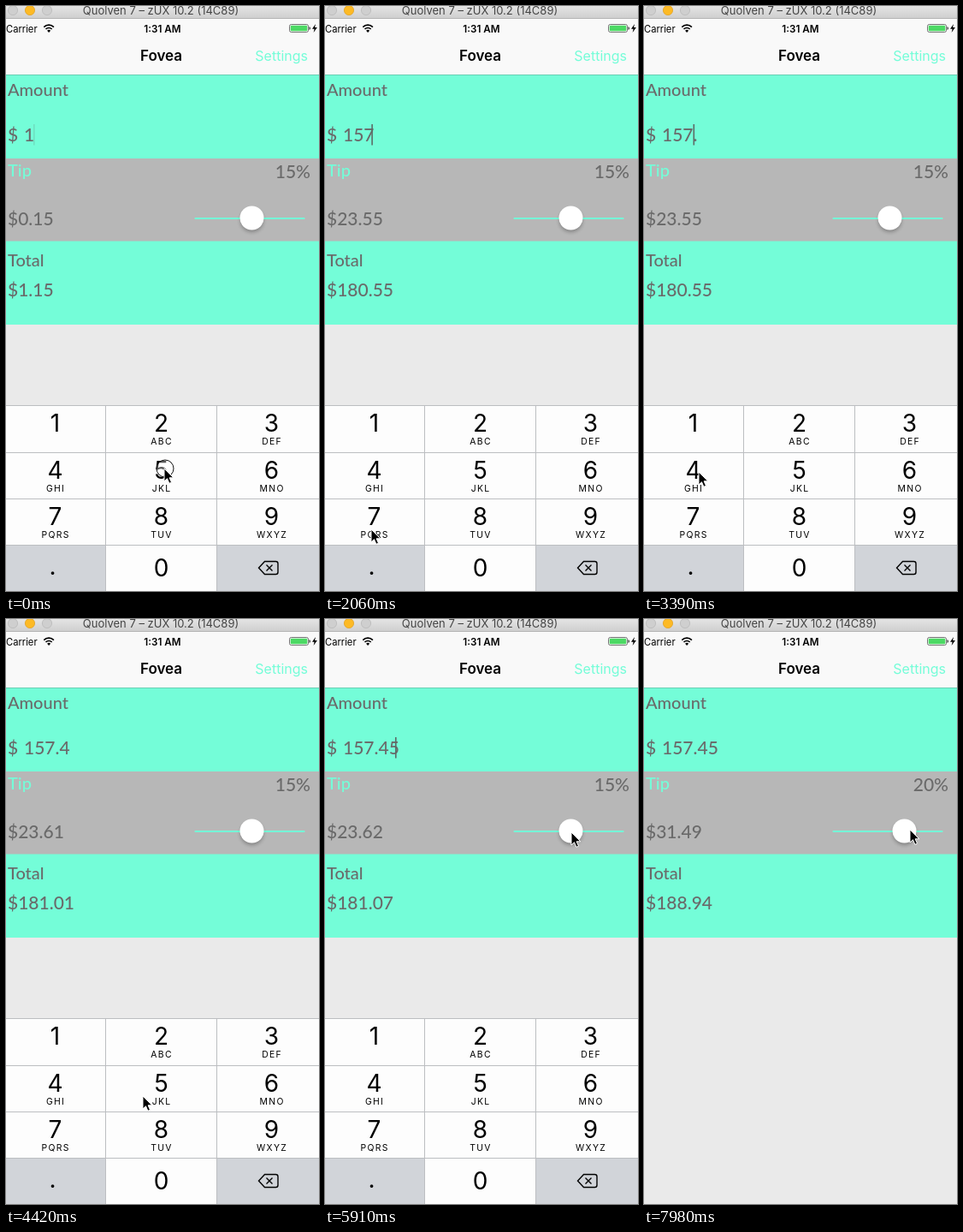
Recreate the animation shown at these times as an HTML page. Size 366 by 683 pixels, loop 8 s.

```html
<!DOCTYPE html>
<html lang="en">
<head>
<meta charset="utf-8">
<title>Tip calculator</title>
<style>
  html, body { margin: 0; width: 100%; height: 100%; overflow: hidden; background: #eaeaea; }
  svg { display: block; width: 366px; height: 683px; }
  text { font-family: Inter, Roboto, sans-serif; white-space: pre; }
  .mid { text-anchor: middle; }
  .label, .value { font-family: Lato, "Open Sans", sans-serif; font-weight: 500; fill: #6a6a6a; }
  .label { font-size: 20px; }
  .value { font-size: 21px; }
  .mint { fill: #74fdd8; }
  .digit { font-size: 28px; text-anchor: middle; }
  .letters { font-size: 10.4px; letter-spacing: 1.3px; text-anchor: middle; }
</style>
</head>
<body>
<svg viewBox="0 0 366 683" xmlns="http://www.w3.org/2000/svg">
  <defs>
    <linearGradient id="bar" x2="0" y2="1">
      <stop stop-color="#e4e4e4"/><stop offset="1" stop-color="#cecece"/>
    </linearGradient>
    <filter id="soft" x="-50%" y="-50%" width="200%" height="200%">
      <feGaussianBlur stdDeviation="2"/>
    </filter>
  </defs>
  <rect width="366" height="683" fill="#eaeaea"/>

  <!-- window bar -->
  <rect width="366" height="15" fill="url(#bar)"/>
  <rect y="14" width="366" height="1" fill="#b4b4b4"/>
  <g fill="#cfcfcf" stroke="#b9b9b9" stroke-width=".8">
    <circle cx="8" cy="5" r="5.6"/>
    <circle cx="28" cy="5" r="5.6" fill="#fdba25" stroke="#e2a323"/>
    <circle cx="48" cy="5" r="5.6"/>
  </g>
  <text class="mid" x="181" y="10" font-size="13" fill="#444">Quolven 7 – zUX 10.2 (14C89)</text>

  <!-- status and navigation -->
  <rect y="15" width="366" height="65" fill="#f9f9f9"/>
  <text x="0" y="30.5" font-size="11.2">Carrier</text>
  <g fill="none" stroke="#000" stroke-width="1.7">
    <path d="M44.3 24.6a8.2 8.2 0 0 1 11.6 0M46.5 27a5.1 5.1 0 0 1 7.2 0"/>
    <path d="M50.1 31l-2-2.2a2.9 2.9 0 0 1 4 0z" fill="#000" stroke="none"/>
  </g>
  <text class="mid" x="183" y="30.5" font-size="11.7" font-weight="600">1:31 AM</text>
  <rect x="331.5" y="21.5" width="22" height="9" rx="2" fill="none" stroke="#555" stroke-width=".8"/>
  <rect x="332.7" y="22.7" width="19.6" height="6.6" rx="1" fill="#4cd964"/>
  <path d="M354.5 24v4q1.6-.6 1.6-2t-1.6-2z" fill="#444"/>
  <path d="M362 21l-4 5.7h2.6l-1 4.3 4.3-6h-2.8z"/>
  <text class="mid" x="181.5" y="64" font-size="17" font-weight="600">Fovea</text>
  <text class="mint" x="353" y="64" font-size="16" text-anchor="end">Settings</text>

  <!-- calculator -->
  <rect class="mint" y="80" width="366" height="292"/>
  <rect y="80" width="366" height="1" fill="#69cfb4"/>
  <rect y="178" width="366" height="96.5" fill="#b7b7b7"/>
  <text class="label" x="2" y="105">Amount</text>
  <text class="label mint" x="2" y="199" style="fill:#74fdd8">Tip</text>
  <text class="label" x="2" y="304">Total</text>
  <text class="value" id="amount" x="2" y="158" word-spacing="1.5"></text>
  <text class="value" id="tip" x="2" y="255.5"></text>
  <text class="value" id="total" x="2" y="338.5"></text>
  <text class="value" id="percent" x="356" y="201" text-anchor="end"></text>
  <rect id="caret" y="138" width="1.6" height="24.5" fill="#5d6b66"/>
  <rect class="mint" x="220.5" y="247" width="129" height="2" rx="1"/>
  <g id="knob">
    <circle cy="3" r="13.5" fill="#000" opacity=".28" filter="url(#soft)"/>
    <circle r="14" fill="#fff"/>
  </g>

  <g id="keypad"></g>

  <g id="pointer">
    <circle id="ring" cx="1" cy="0" r="10" fill="#fff" fill-opacity=".35" stroke="#111" stroke-width="1"/>
    <path d="M0 0v15l3.5-3.3 2.4 5.6 2.6-1.1-2.4-5.4h4.7z" stroke="#fff" stroke-width="1"/>
  </g>
</svg>
<script>
const LOOP = 8000, TICK = 147.6;
const $ = id => document.getElementById(id);

const columns = [[0, 116, 57.5], [117, 129, 181.5], [247, 119, 310.5]];
const rows = [[467, 54], [522, 53], [576, 53], [630, 53]];
const letters = ['', 'ABC', 'DEF', 'GHI', 'JKL', 'MNO', 'PQRS', 'TUV', 'WXYZ'];
const names = [...'123456789.0', 'delete'];

function keyMarkup(name, i) {
  const [x, w, cx] = columns[i % 3], [y, h] = rows[Math.floor(i / 3)];
  const back = `<rect id="key${name}" x="${x}" y="${y}" width="${w}" height="${h}"/>`;
  if (name === 'delete')
    return back + `<path d="M302.5 648.5h13q2.5 0 2.5 2.5v10q0 2.5-2.5 2.5h-13l-7-7.5z
      M304.5 652.5l7 7m0-7l-7 7" fill="none" stroke="#000" stroke-width="1.4"/>`;
  if (name === '.') return back + '<text class="digit" x="54.5" y="664">.</text>';
  const base = name === '0' ? 666 : y + 30;
  return back + `<text class="digit" x="${cx}" y="${base}">${name}</text>` +
    `<text class="letters" x="${cx + .6}" y="${base + 15}">${letters[i] || ''}</text>`;
}
$('keypad').innerHTML = '<rect y="466" width="366" height="217" fill="#bcbec1"/>' +
  names.map(keyMarkup).join('');

// Every track lists [tick, value...]; a value holds until the next entry.
const amounts = [[0, '1', 32], [2, '15', 43], [13, '157', 54.3], [21, '157.', 57.5],
  [25, '157.4', 70], [33, '157.45', 82]];
const percents = [[0, 15], [43, 16], [44, 18], [45, 19], [46, 20]];
const presses = [[0, ''], [1, '5'], [2, ''], [12, '7'], [13, ''], [19, '.'], [21, ''],
  [24, '4'], [25, ''], [32, '5'], [33, '']];
const rings = [[0, 1], [2, 0], [12, 1], [13, 0], [19, 1], [21, 0], [24, 1], [25, 0],
  [32, 1], [33, 0], [42, 1], [50, 0]];
const carets = [[0, .2], [1, 0], [2, 1], [8, .2], [9, 0], [12, 1], [16, .2], [17, 0],
  [19, 1], [24, .2], [25, 1], [29, .2], [30, 0], [32, 1], [37, .2], [38, 0], [40, 1],
  [43, .2], [44, 0], [46, 1], [50, .2], [52, 0]];
const slides = [[0, 0], [52, 60], [53, 190], [54, 217]];
// The pointer glides between its stops.
const stops = [[0, 185, 540], [2, 185, 540], [4, 120, 580], [6, 54, 604], [13, 54, 604],
  [14, 54, 611], [15, 54, 611], [18, 55, 655], [21, 56, 655], [23, 64, 544], [25, 64, 544],
  [27, 160, 557], [30, 160, 557], [31, 185, 545], [34, 185, 545], [36, 215, 440],
  [38, 278, 272], [39, 287, 251], [40, 288, 249], [42, 288, 248], [46, 311, 246]];

const hold = (track, n) => track.findLast(entry => entry[0] <= n);
const value = (track, n) => hold(track, n)[1];

function glide(n) {
  const next = stops.findIndex(s => s[0] > n);
  if (next < 0) return stops.at(-1).slice(1);
  const a = stops[next - 1], b = stops[next], k = (n - a[0]) / (b[0] - a[0]);
  return [1, 2].map(i => a[i] + (b[i] - a[i]) * k);
}

function draw(n) {
  const [, typed, caretX] = hold(amounts, n);
  const rate = value(percents, n), pressed = value(presses, n);
  const tip = Math.round(typed * rate) / 100;
  $('amount').textContent = '$ ' + typed;
  $('tip').textContent = '$' + tip.toFixed(2);
  $('total').textContent = '$' + (+typed + tip).toFixed(2);
  $('percent').textContent = rate + '%';
  $('caret').setAttribute('x', caretX);
  $('caret').setAttribute('opacity', value(carets, n));
  $('knob').setAttribute('transform', `translate(${287.5 + (rate - 15) * 3.4} 247.5)`);
  $('keypad').setAttribute('transform', `translate(0 ${value(slides, n)})`);
  $('pointer').setAttribute('transform', `translate(${glide(n)})`);
  $('ring').setAttribute('opacity', value(rings, n));
  for (const name of names) {
    const gray = name === '.' || name === 'delete';
    $('key' + name).setAttribute('fill', gray !== (name === pressed) ? '#d1d4d9' : '#fdfdfd');
  }
}

let shown = -1;
function frame() {
  const n = Math.floor((performance.now() % LOOP + 12) / TICK);
  if (n !== shown) draw(shown = n);
  requestAnimationFrame(frame);
}
frame();
</script>
</body>
</html>
```
